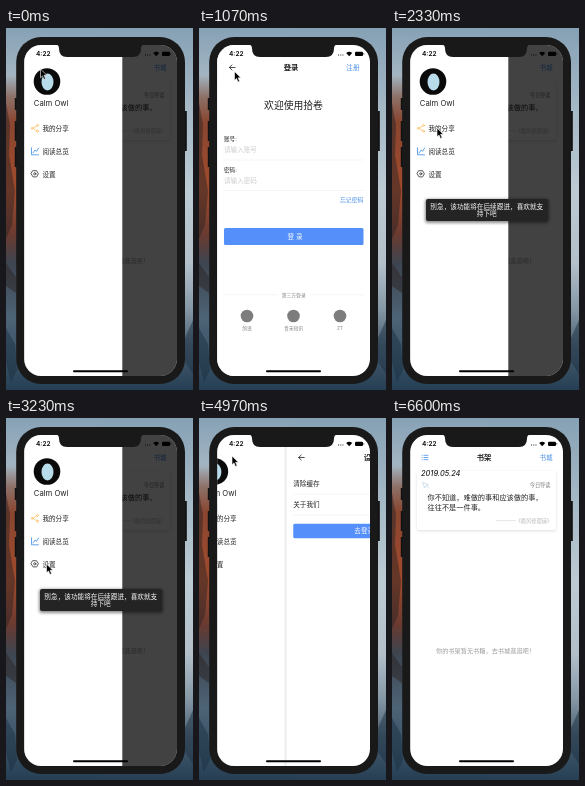
Recreate the animation shown at these times as an HTML page. Size 187 by 362 pixels, loop 6.63 s.

```html
<!DOCTYPE html>
<html>
<head>
<meta charset="utf-8">
<title>Reader app</title>
<style>
html, body { margin: 0; width: 100%; height: 100%; overflow: hidden; background: #8ba4b6; }
svg { display: block; width: 100%; height: 100%; }
text { font: 6.6px Inter, "Noto Sans CJK SC", "Noto Sans CJK", sans-serif; fill: #222; }
.line { fill: none; stroke-width: .8; stroke-linecap: round; stroke-linejoin: round; }
.rule { stroke: #eee; stroke-width: .6; }
.mid { text-anchor: middle; }
.end { text-anchor: end; }
.title { font-size: 7.3px; font-weight: 600; text-anchor: middle; }
.blue { fill: #4a90e8; }
.hint { fill: #ccc; }
.small { font-size: 4.8px; fill: #888; }
.white { fill: #fff; }
.btn { fill: #548ffa; }
</style>
</head>
<body>
<svg viewBox="0 0 187 362">
  <defs>
    <linearGradient id="left" x2="0" y2="1">
      <stop offset="0" stop-color="#86a1b5"/><stop offset=".13" stop-color="#a3b5c2"/>
      <stop offset=".19" stop-color="#8d7168"/><stop offset=".26" stop-color="#8a4630"/>
      <stop offset=".45" stop-color="#a04a2c"/><stop offset=".57" stop-color="#6a3a30"/>
      <stop offset=".65" stop-color="#3d4550"/><stop offset=".8" stop-color="#4d6376"/>
      <stop offset=".9" stop-color="#3a5468"/><stop offset="1" stop-color="#263f54"/>
    </linearGradient>
    <linearGradient id="right" x2="0" y2="1">
      <stop offset="0" stop-color="#86a1b5"/><stop offset=".2" stop-color="#a2b6c4"/>
      <stop offset=".45" stop-color="#bccad3"/><stop offset=".65" stop-color="#b3c0ca"/>
      <stop offset=".78" stop-color="#8496a4"/><stop offset=".88" stop-color="#4a5f70"/>
      <stop offset="1" stop-color="#263f54"/>
    </linearGradient>
    <clipPath id="screen"><rect x="18.2" y="17" width="152.8" height="331" rx="17"/></clipPath>
    <filter id="soft" x="-20%" y="-40%" width="140%" height="180%"><feGaussianBlur stdDeviation="1.8"/></filter>
    <path id="back" class="line" stroke="#222" d="M36 39.5H30.5M33 37l-2.6 2.5L33 42"/>
  </defs>

  <!-- wallpaper -->
  <rect width="187" height="362" fill="url(#right)"/>
  <rect width="95" height="362" fill="url(#left)"/>
  <path d="M0 75l4 22-1 30 6 36-3 34-6 14zM0 235l10 14v16L0 258z" fill="#2d2425" opacity=".5"/>
  <path d="M0 300l9 16 2 26-6 12-5-20zM187 292l-8 18v24l8 12z" fill="#1d3142" opacity=".5"/>

  <!-- phone body -->
  <path d="M10 70v12M10 93v20M10 119v20M179.6 83v40" stroke="#111" stroke-width="2.4"/>
  <rect x="10.2" y="9" width="168.8" height="347" rx="25" fill="#191919"/>

  <g clip-path="url(#screen)">
    <g id="base">
      <rect x="18" y="17" width="153" height="332" fill="#fff"/>
      <path class="line" stroke="#4a90e8" d="M30 37.3h.2M32 37.3h4M30 39.5h.2M32 39.5h4M30 41.7h.2M32 41.7h4"/>
      <text class="title" x="92" y="42.2">书架</text>
      <text class="blue" x="147.5" y="42">书城</text>
      <rect x="25" y="54" width="139" height="59" rx="2" fill="#000" opacity=".13" filter="url(#soft)"/>
      <rect x="25" y="53" width="139" height="59" rx="2" fill="#fff"/>
      <text x="29" y="58" style="font-size:7.4px;font-style:italic;font-weight:500">2019.05.24</text>
      <path class="line" stroke="#a9c3dc" style="stroke-width:.5" d="M30.5 64.5l6 2-2.5 1.2L37 70M31 65l1.5 5 1.5-2.3"/>
      <text class="end" x="158.5" y="68.7" style="font-size:5.2px;fill:#777">今日导读</text>
      <text x="35.5" y="81.8" style="font-size:7.2px">你不知道，难做的事和应该做的事，</text>
      <text x="35.5" y="92.3" style="font-size:7.2px">往往不是一件事。</text>
      <path d="M104 102.6h20" stroke="#ccc" stroke-width=".5"/>
      <text class="end" x="160" y="104.6" style="font-size:5.2px;fill:#bbb">《晚风修理铺》</text>
      <text x="44" y="235.2" style="font-size:6.2px;fill:#999">你的书架暂无书籍，去书城逛逛吧！</text>

      <rect id="dim" x="18" y="17" width="153" height="332"/>
      <g id="drawer">
        <rect x="18" y="17" width="98.3" height="332" fill="#fff"/>
        <circle cx="41" cy="53.5" r="13.3" fill="#0a0a0a"/>
        <ellipse cx="41.5" cy="54" rx="6" ry="8.5" fill="#b9dcea"/>
        <text x="27.8" y="77.8" style="font-size:7.7px">Calm Owl</text>
        <g class="line" stroke="#fabf62">
          <path d="M31 97.7l-4 2.6 4 2.6"/>
          <circle cx="26.3" cy="100.3" r="1" fill="#fff"/>
          <circle cx="31.5" cy="97.4" r="1" fill="#fff"/>
          <circle cx="31.5" cy="103.2" r="1" fill="#fff"/>
        </g>
        <path class="line" stroke="#3c8de8" d="M25.5 119.8v7h7M27 125l2-3 1.6 1.3 2-3.3"/>
        <path class="line" stroke="#333" d="M27 142.7h3.6l1.8 3.1-1.8 3.1H27l-1.8-3.1z"/>
        <circle class="line" stroke="#333" cx="28.8" cy="145.8" r="1.1"/>
        <text x="36.4" y="102.9">我的分享</text>
        <text x="36.4" y="125.9">阅读总览</text>
        <text x="36.4" y="148.6">设置</text>
      </g>
    </g>

    <g id="login">
      <rect x="18" y="17" width="153" height="332" opacity=".25" filter="url(#soft)"/>
      <rect x="18" y="17" width="153" height="332" fill="#fff"/>
      <use href="#back"/>
      <text class="title" x="92" y="42.2">登录</text>
      <text class="blue" x="147.3" y="42">注册</text>
      <text class="mid" x="94.5" y="81" style="font-size:9.8px">欢迎使用拾卷</text>
      <text x="25" y="112.5" style="font-size:5.6px">账号:</text>
      <text class="hint" x="25" y="124">请输入账号</text>
      <text x="25" y="143.8" style="font-size:5.6px">密码:</text>
      <text class="hint" x="25" y="155.4">请输入密码</text>
      <path class="rule" d="M25 132h139.5M25 162.5h139.5"/>
      <text class="blue end" x="164.5" y="174.4" style="font-size:5.9px">忘记密码</text>
      <rect class="btn" x="25" y="200" width="139.5" height="17" rx="1.5"/>
      <text class="white mid" x="96" y="210.9">登 录</text>
      <path class="rule" d="M25 266.8h54M110 266.8h54.5"/>
      <text class="small mid" x="94.7" y="268.6">第三方登录</text>
      <g fill="#7d7d7d">
        <circle cx="48" cy="288" r="6.3"/>
        <circle cx="94.5" cy="288" r="6.3"/>
        <circle cx="141" cy="288" r="6.3"/>
      </g>
      <text class="small mid" x="48" y="302.3">鸽语</text>
      <text class="small mid" x="94.5" y="302.3">青禾短讯</text>
      <text class="small mid" x="141" y="302.3">ZT</text>
    </g>

    <g id="settings">
      <rect x="18" y="17" width="153" height="332" opacity=".25" filter="url(#soft)"/>
      <rect x="18" y="17" width="153" height="332" fill="#fff"/>
      <use href="#back"/>
      <text class="title" x="102.7" y="42.2">设置</text>
      <text x="25" y="67.6">清除缓存</text>
      <text class="hint end" x="164.5" y="67" style="font-size:5.4px">0.00M</text>
      <path class="rule" d="M25 76h139.5M25 97h139.5"/>
      <text x="25" y="89">关于我们</text>
      <path class="line" stroke="#bbb" d="M159.5 83.3l3.2 3.2-3.2 3.2"/>
      <rect class="btn" x="25" y="105.7" width="139.5" height="14.5" rx="1.5"/>
      <text class="white mid" x="96" y="115.3">去登录</text>
    </g>

    <g id="toast">
      <rect x="33" y="171" width="124" height="24" rx="3" opacity=".45" filter="url(#soft)"/>
      <rect x="34" y="171" width="122" height="22" rx="2" fill="#242424"/>
      <text class="white mid" x="94.8" y="181" style="font-size:6.65px">别急，该功能将在后续跟进，喜欢就支</text>
      <text class="white mid" x="94.8" y="188.4" style="font-size:6.65px">持下吧</text>
    </g>

    <!-- status bar and home indicator -->
    <text x="30" y="28.3" style="font-size:6.5px;font-weight:600;fill:#000">4:22</text>
    <path d="M139.5 27h.1M141.7 27h.1M143.9 27h.1" stroke="#000" stroke-width="1" stroke-linecap="round"/>
    <path d="M147.2 25q3-2.6 6 0l-3 3.3z"/>
    <rect x="156" y="23.8" width="8" height="4.2" rx="1.1"/>
    <path d="M164.8 25.2v1.4" stroke="#000" stroke-width=".7"/>
    <rect x="67" y="342.3" width="55" height="2" rx="1"/>
  </g>
  <path d="M50 16.5q3 .5 3 4 0 8.5 8 8.5h66q8 0 8-8.5 0-3.5 3-4z" fill="#191919"/>

  <path id="cursor" d="M0 0v8.8l2-1.9 1.5 3.5 1.6-.7-1.5-3.4h2.8z" fill="#000" stroke="#fff" stroke-width=".6"/>
</svg>
<script>
const LOOP = 6630, WIDTH = 153, DRAWER = 98.3;
const $ = id => document.getElementById(id);
const clamp = v => Math.min(1, Math.max(0, v));
const easeOut = v => 1 - (1 - v) ** 3;
const smooth = v => v * v * (3 - 2 * v);
const ramp = (t, start, length, ease = easeOut) => ease(clamp((t - start) / length));
const move = (id, x, y = 0) => $(id).setAttribute("transform", `translate(${x} ${y})`);
const fade = (id, v) => $(id).setAttribute("opacity", v);

// Each pointer move: start, length, x, y
const moves = [
  [620, 380, 35.5, 43.5], [1090, 120, 34, 41],
  [1500, 420, 45, 100], [2450, 200, 45, 123], [2850, 300, 40.5, 146],
  [3800, 280, 40.5, 90], [4300, 400, 33, 38],
  [5350, 330, 128.5, 93.5], [6260, 300, 180, -14]
];

function pointer(t) {
  let x = 34.5, y = 41;
  for (const [start, length, toX, toY] of moves) {
    const k = ramp(t, start, length, smooth);
    x += (toX - x) * k;
    y += (toY - y) * k;
  }
  return [x, y];
}

function showPage(id, p) {
  move(id, WIDTH * (1 - p));
  $(id).style.display = p > 0 ? "" : "none";
}

function draw(now) {
  const t = now % LOOP;
  const login = ramp(t, 180, 500) - ramp(t, 1305, 500);
  const settings = ramp(t, 3320, 500) - ramp(t, 4880, 500);
  const closed = ramp(t, 5900, 320);
  showPage("login", login);
  showPage("settings", settings);
  move("base", -0.3 * WIDTH * Math.max(login, settings));
  move("drawer", -DRAWER * closed);
  fade("dim", 0.74 * (1 - closed));
  fade("toast", ramp(t, 2150, 150) - ramp(t, 4600, 200));
  move("cursor", ...pointer(t));
  requestAnimationFrame(draw);
}
requestAnimationFrame(draw);
</script>
</body>
</html>
```
